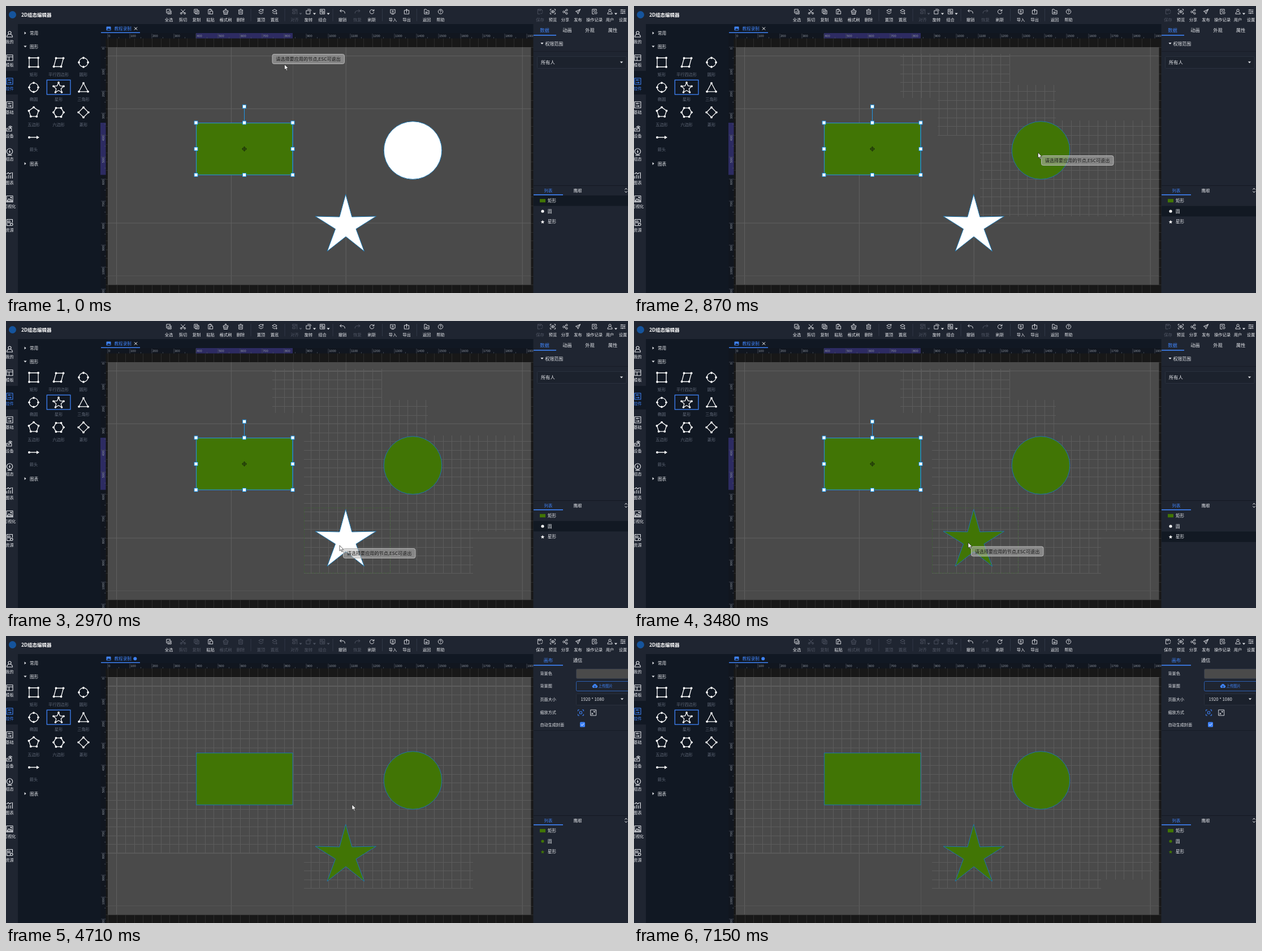
Recreate the animation shown at these times as an HTML page. Size 1100 by 509 pixels, loop 7550 ms.

```html
<!DOCTYPE html>
<html lang="zh">
<head>
<meta charset="utf-8">
<title>编辑器</title>
<style>
html, body { margin: 0; width: 100%; height: 100%; overflow: hidden; background: #1a1a1a; }
svg { display: block; width: 100vw; height: 100vh; font-family: "Noto Sans CJK SC", "Noto Sans CJK", "Noto Sans", sans-serif; }
</style>
</head>
<body>
<svg id="stage" viewBox="0 0 1100 509" preserveAspectRatio="none"></svg>
<script>
const LOOP = 7550, DONE = 4710;
const BLUE = '#3f83f8', WHITE = '#e6e8ec', DIM = '#505664', GREEN = '#417505', BAR = '#1f2531', PANEL = '#111823';
const CELL = 15.6, UNIT = 39;

const rect = (x, y, w, h, fill, more = '') => `<rect x="${x}" y="${y}" width="${w}" height="${h}" fill="${fill}" ${more}/>`;
const line = (x1, y1, x2, y2, color, w = 1) => `<path d="M${x1} ${y1}L${x2} ${y2}" stroke="${color}" stroke-width="${w}"/>`;
const dot = (x, y, r, fill, more = '') => `<circle cx="${x}" cy="${y}" r="${r}" fill="${fill}" ${more}/>`;
const text = (s, x, y, size = 7.5, fill = WHITE, anchor = 'middle', more = '') =>
  `<text x="${x}" y="${(y + size * .37).toFixed(2)}" font-size="${size}" fill="${fill}" text-anchor="${anchor}" ${more}>${s}</text>`;
const icon = (d, x, y, color = WHITE, scale = 1, w = 1) =>
  `<path d="${d}" transform="translate(${x} ${y}) scale(${scale})" fill="none" stroke="${color}" stroke-width="${w}" stroke-linejoin="round"/>`;
const caret = (x, y, color = WHITE, turn = 0) =>
  `<path d="M-2.6 -1.4H2.6L0 1.6Z" transform="translate(${x} ${y}) rotate(${turn})" fill="${color}"/>`;
const group = (id, body) => `<g id="${id}">${body}</g>`;
const range = (n, f) => Array.from({ length: n }, (_, i) => f(i)).join('');
const ring = (n, r, turn = -90) => Array.from({ length: n }, (_, i) => {
  const a = (turn + i * 360 / n) * Math.PI / 180;
  return [r * Math.cos(a), r * Math.sin(a)];
});
const starPts = (r, inner) => {
  const out = ring(5, r), mid = ring(5, inner, -54);
  return out.flatMap((p, i) => [p, mid[i]]);
};
const poly = pts => 'M' + pts.map(p => p.map(v => v.toFixed(2)).join(' ')).join('L') + 'Z';

const ICONS = {
  all: 'M-4.5 -4.5H2.5V2.5H-4.5ZM4.5 -2V4.5H-2.5M-3 -1L-1.3 .8L1.5 -2.5',
  cut: 'M-4 -4.5L2.5 3M4 -4.5L-2.5 3M-5 3.2a1.6 1.6 0 1 0 3.2 0a1.6 1.6 0 1 0 -3.2 0M1.8 3.2a1.6 1.6 0 1 0 3.2 0a1.6 1.6 0 1 0 -3.2 0',
  copy: 'M-4.5 -4.5H2V2.5H-4.5ZM-2 2.5V4.5H4.5V-2H2M-1.2 -3V1M-3.2 -1H.8',
  paste: 'M-4 -4H2.5V-1M-4 -4V4.5H-1M-1 -1H4.5V4.5H-1ZM-2 -4.8H1',
  brush: 'M-1 -5H1V-2H4.5V1H-4.5V-2H-1ZM-3.5 1V5H3.5V1M-1 5V3M1.3 5V3',
  bin: 'M-4.5 -3H4.5M-1.5 -4.7H1.5M-3.5 -3V4.7H3.5V-3M-1.2 -1V2.7M1.2 -1V2.7',
  up: 'M-4.5 -2L0 -4.5L2 -3.3M-4.5 -2L0 .5L2 -.6M-4.5 1.5L0 4.2L4.5 1.5M3.5 0V-4.5M2 -3L3.5 -4.7L5 -3',
  down: 'M-4.5 -2L0 -4.5L4.5 -2L0 .5ZM-4.5 1.5L0 4.2L1.5 3.3M3.5 0V4.5M2 3L3.5 4.7L5 3',
  align: 'M-4 -4.5H2.5V-1.5H-4ZM-4 1H1V4H-4ZM4.5 -5V5',
  turn: 'M-4.5 -2H3V4.5H-4.5ZM-2 -4.5H2.5Q4.8 -4.5 4.8 -1.5',
  join: 'M-4.5 -4.5H4.5V4.5H-4.5ZM-2.5 -2.5H.8V.8H-2.5ZM-.8 2.5H2.5V-.8',
  undo: 'M-4.8 -1.5H1.5Q4.8 -1 4.8 3.5M-2 -4.3L-4.8 -1.5L-2 1.3',
  redo: 'M4.8 -1.5H-1.5Q-4.8 -1 -4.8 3.5M2 -4.3L4.8 -1.5L2 1.3',
  fresh: 'M3.7 -1.5A4 4 0 1 0 4 1M4.2 -4.5V-1.3H1',
  input: 'M-1.5 -4H-4.5V3H4.5V-4H1.5M0 -4.8V.5M-2 -1.3L0 .7L2 -1.3M-2.5 5H2.5',
  output: 'M-1 -2.5H-4.5V4.5H4.5V-2.5H1M0 2V-4.8M-2 -2.8L0 -4.8L2 -2.8',
  back: 'M-1 -4.5H-4.5V4.5H4.5V-2H1L-1 -4.5M3 1.5H-2M0 -.5L-2 1.5L0 3.5',
  help: 'M-4.5 0a4.5 4.5 0 1 0 9 0a4.5 4.5 0 1 0 -9 0M-1.5 -1.2Q-1.3 -2.7 0 -2.7T1.5 -1.2Q1.4 -.2 0 .3V1.3M0 2.2V3',
  save: 'M0 4.5H-4.5V-4.5H2.5L4.5 -2.5V0M-2.5 -4.5V-2H1.5V-4.5M1 2.8L2.5 4.3L5 1.3',
  view: 'M-5 -2V-4.5H-2.5M5 -2V-4.5H2.5M-5 2V4.5H-2.5M5 2V4.5H2.5M-4 0Q0 -4.5 4 0Q0 4.5 -4 0M-1 0a1 1 0 1 0 2 0a1 1 0 1 0 -2 0',
  share: 'M-4.5 .5a1.7 1.7 0 1 0 3.4 0a1.7 1.7 0 1 0 -3.4 0M1 -3a1.7 1.7 0 1 0 3.4 0a1.7 1.7 0 1 0 -3.4 0M1 3.4a1.7 1.7 0 1 0 3.4 0a1.7 1.7 0 1 0 -3.4 0M-1.3 -.2L1.3 -2.2M-1.3 1.3L1.3 2.7',
  send: 'M4.5 -4.5L-4.5 -.5L-1.2 1L0 4.5ZM4.5 -4.5L-1.2 1',
  log: 'M0 4.5H-4V-4.5H4V-1M-2 -2H2M-2 .3H0M1 2.3a2 2 0 1 0 4 0a2 2 0 1 0 -4 0',
  user: 'M-2.3 -2.3a2.3 2.3 0 1 0 4.6 0a2.3 2.3 0 1 0 -4.6 0M-1.5 .3Q-4.5 1 -4.5 4.5H4.5Q4.5 1 1.5 .3',
  tune: 'M-5 -3.2H5M-5 0H5M-5 3.2H5M-2 -4.5V-2M2.5 -1.3V1.3M-1 2V4.5',
  page: 'M-5 -4.5H5V4.5H-5ZM-5 -1.3H5M-1 -1.3V4.5',
  box: 'M-5 -5H5V5H-5ZM-3 -2H3M-3 2H3M-1 -3.3V-.7M1.2 .7V3.3',
  device: 'M-5 0H3V4.5H-5ZM-3 2.2H0M1 0V-2M-2 -2Q1 -5 4 -2M-.5 -1Q1 -2.5 2.5 -1',
  cog: 'M-4.7 -.7a4.7 4.7 0 1 0 9.4 0a4.7 4.7 0 1 0 -9.4 0M0 -3V1.5M-1.5 0H1.5M-3.5 5.3H3.5',
  chart: 'M-4.5 5V1M-1.5 5V-1M1.5 5V0M4.5 5V-5M-5 -2.5L-2 -4.5L0 -2.5L3 -4.5',
  image: 'M-5 -5H5V5H-5ZM-4 3.5L-1.3 -.5L.8 2L2.3 .5L4 3.5ZM1.5 -2.3a.8 .8 0 1 0 1.6 0a.8 .8 0 1 0 -1.6 0',
  stock: 'M1 5H-4.5V-5H4.5V0M-2.5 -2.5H.5V.5H-2.5ZM1 3a2 2 0 1 0 4 0a2 2 0 1 0 -4 0'
};

// label, icon, x, mode: 1 always off, 2 off once editing ends, 3 on once editing ends
const TOOLS = [
  ['全选', 'all', 288], ['剪切', 'cut', 313, 2], ['复制', 'copy', 337, 2], ['粘贴', 'paste', 361.5],
  ['格式刷', 'brush', 388.5, 2], ['删除', 'bin', 415, 2], ['置顶', 'up', 451, 2], ['置底', 'down', 475, 2],
  ['对齐', 'align', 510.5, 1, 1], ['旋转', 'turn', 535, 2, 1], ['组合', 'join', 559.5, 2, 1],
  ['撤销', 'undo', 595], ['恢复', 'redo', 621.5, 1], ['刷新', 'fresh', 647],
  ['导入', 'input', 684], ['导出', 'output', 708.5], ['返回', 'back', 744], ['帮助', 'help', 768.5],
  ['保存', 'save', 944.5, 3], ['预览', 'view', 967], ['分享', 'share', 989], ['发布', 'send', 1011.5],
  ['操作记录', 'log', 1040.5], ['用户', 'user', 1068, 0, 1], ['设置', 'tune', 1091]
];
const tools = done => TOOLS.map(([label, name, x, mode = 0, menu]) => {
  const off = mode === 1 || mode === 2 && done || mode === 3 && !done;
  const color = off ? DIM : WHITE;
  return icon(ICONS[name], x, 10, color, .92) + text(label, x, 24, 7.3, color) + (menu ? caret(x + 10.5, 14, color) : '');
}).join('');

function topBar() {
  return rect(0, 0, 1100, 32, BAR) + dot(11.5, 15.5, 6.5, '#15549c') +
    text('2D组态编辑器', 27, 15.5, 8.5, '#fff', 'start', 'font-weight="700"') +
    [433, 493, 578, 665.5, 726.5].map(x => line(x, 5, x, 27, '#303746')).join('');
}

function rail() {
  const items = [['我的', 'user'], ['模板', 'page'], ['控件', 'box'], ['基础', 'box'], ['设备', 'device'],
    ['组态', 'cog'], ['图表', 'chart'], ['可视化', 'image'], ['资源', 'stock']];
  return rect(0, 32, 21, 477, BAR) + rect(0, 115, 21, 42, PANEL) + items.map(([label, name], i) => {
    const color = i === 2 ? BLUE : WHITE, y = 50 + i * 41.75;
    return icon(ICONS[name], 6.5, y, color, 1.1) + text(label, 6.5, y + 13, 7.2, color);
  }).join('');
}

const nodes = (pts, closed = true) => icon(poly(pts).slice(0, closed ? undefined : -1), 0, 0, '#fff', 1, 1.3) +
  pts.map(p => dot(p[0].toFixed(2), p[1].toFixed(2), 1.9, '#fff')).join('');

function palette() {
  const round = dot(0, 0, 8, 'none', 'stroke="#fff" stroke-width="1.3"') + ring(4, 8).map(p => dot(...p, 1.9, '#fff')).join('');
  const star = icon(poly(starPts(9.5, 4.5)), 0, 1, '#fff', 1, 1.3) + ring(5, 9.5).map(p => dot(p[0], p[1] + 1, 1.8, '#fff')).join('');
  const shapes = [
    ['矩形', nodes([[-8, -8], [8, -8], [8, 8], [-8, 8]])],
    ['平行四边形', nodes([[-4.5, -7.5], [8.5, -7.5], [4.5, 7.5], [-8.5, 7.5]])],
    ['圆形', round], ['椭圆', round], ['星形', star],
    ['三角形', nodes([[0, -7.5], [8, 7.5], [-8, 7.5]])],
    ['五边形', nodes(ring(5, 9))], ['六边形', nodes(ring(6, 9, 0))], ['菱形', nodes(ring(4, 8.8))],
    ['箭头', dot(-8, 0, 2, '#fff') + line(-8, 0, 7, 0, '#fff', 1.4) + '<path d="M5 -3L10 0L5 3Z" fill="#fff"/>']
  ];
  return rect(21, 32, 146, 477, PANEL) +
    [['常用', 48.5, -90], ['图形', 72.5, 0], ['图表', 280, -90]].map(([s, y, a]) => caret(34, y - .5, WHITE, a) + text(s, 42, y, 7.6, WHITE, 'start')).join('') +
    rect(72.3, 131.3, 41.6, 25.6, 'none', `stroke="${BLUE}" stroke-width="1.3"`) +
    shapes.map(([label, art], i) => {
      const x = 49 + i % 3 * 44, y = 100 + Math.floor(i / 3) * 44.3;
      return `<g transform="translate(${x} ${y})">${art}</g>` + text(label, x, y + 21.3, 7.2, '#636b7a');
    }).join('');
}

const vLines = (y1, y2, color) => range(49, i => line(Math.round(164.4 + i * CELL) + .5, y1, Math.round(164.4 + i * CELL) + .5, y2, color));
const hLines = (x1, x2, color) => range(29, i => line(x1, Math.round(73 + i * CELL) + .5, x2, Math.round(73 + i * CELL) + .5, color));

function board() {
  const major = [1, 14, 27, 47].map(i => line(180 + i * CELL, 73, 180 + i * CELL, 494, '#606060')).join('') +
    line(507.5, 73, 507.5, 494, '#555') +
    [1, 7, 20].map(i => line(180, 73 + i * CELL, 928, 73 + i * CELL, '#606060')).join('') + line(180, 478.5, 928, 478.5, '#555');
  return rect(167, 32, 766, 477, '#181818') + vLines(57, 509, '#2b2b2b') + hLines(176, 933, '#2b2b2b') +
    rect(180, 73, 748.5, 421.5, '#4a4a4a') + major +
    `<clipPath id="clip"><path id="shown"/></clipPath><g clip-path="url(#clip)">${vLines(73, 494, '#5c5c5c')}${hLines(180, 928.5, '#5c5c5c')}</g>`;
}

function rulers() {
  const ink = '#9299a3', tick = '#4a505b', font = 'font-family="Liberation Sans, Arial, sans-serif"';
  return rect(167, 32, 766, 16, PANEL) + rect(167, 48, 766, 9.5, '#11161f') + rect(167, 48, 9.5, 461, '#11161f') +
    group('span', rect(336, 48, 171, 9.5, '#2d2b62') + rect(167, 207, 9.5, 92.5, '#2d2b62')) +
    range(39, i => line(180 + i * UNIT / 2, i % 2 ? 55 : 49, 180 + i * UNIT / 2, 57.5, tick, .8)) +
    range(23, i => line(i % 2 ? 174 : 168, 73 + i * UNIT / 2, 176.5, 73 + i * UNIT / 2, tick, .8)) +
    range(20, i => text(i * 100, 181.2 + i * UNIT, 52.5, 5.6, ink, 'start', font)) +
    range(11, i => `<g transform="translate(171.5 ${74 + i * UNIT}) rotate(-90)">${text(i * 100, 0, 0, 5.6, ink, 'end', font)}</g>`) +
    text('1100', 0, 0, 5.6, ink, 'end', `${font} transform="translate(171.5 503) rotate(-90)"`) +
    rect(177.5, 36.5, 8, 7, BLUE, 'rx="1"') + '<path d="M178.5 42.5L181 39.5L182.5 41L183.5 40L185 42.5Z" fill="#111823"/>' +
    text('教程录制', 191.5, 40.3, 7.6, BLUE, 'start') + rect(168, 46.5, 69, 1.5, BLUE) +
    group('close', icon('M-2.5 -2.5L2.5 2.5M2.5 -2.5L-2.5 2.5', 229.5, 40, '#fff')) + group('dirty', dot(228.3, 40.3, 3, BLUE));
}

const STAR = 'M600.7 334L611.8 374L654.5 373L619 395.5L633.5 435L601 409L568 435L582.5 395.5L547 373L589.8 374Z';

function shapes() {
  const edge = 'stroke="#1b76b0" stroke-width="1"';
  const handles = [[336, 207], [421.5, 207], [507, 207], [336, 253.5], [507, 253.5], [336, 299.5], [421.5, 299.5], [507, 299.5], [421.5, 178.3]]
    .map(([x, y]) => rect(x - 3, y - 3, 6, 6, '#fff', 'stroke="#1f95e8"')).join('');
  return rect(336.5, 207.5, 170.5, 92, GREEN, edge) +
    `<circle id="disc" cx="719.5" cy="256" r="51.3" ${edge}/>` +
    group('hover', rect(527.5, 331.5, 152, 115.5, 'none', 'stroke="#3c6a30" stroke-dasharray="4 2" opacity=".6"')) +
    `<path id="star" d="${STAR}" ${edge}/>` +
    group('picked', rect(336.5, 207.5, 170.5, 92, 'none', 'stroke="#1f95e8"') + line(421.5, 178, 421.5, 207, '#1f95e8') + handles +
      icon('M-3 0a3 3 0 1 0 6 0a3 3 0 1 0 -6 0M-4.5 0H4.5M0 -4.5V4.5', 421.5, 253.5, '#17260c', 1, .9));
}

const tabs = (names, y, size, mark) => names.map(([s, x], i) => text(s, x, y, size, i ? WHITE : BLUE)).join('') + rect(933, mark[0], mark[1], 1.6, BLUE);

function nodePanel() {
  return tabs([['数据', 952.5], ['动画', 992.5], ['外观', 1032.5], ['属性', 1073]], 42.5, 8.3, [51, 40]) +
    caret(948, 66.5) + text('权限范围', 953.5, 67, 7.9, WHITE, 'start') + line(933, 80.5, 1100, 80.5, '#171c26') +
    rect(939.5, 89.5, 157.5, 21, '#1c222d', 'stroke="#2a313e" rx="1"') + text('所有人', 946, 100, 8.2, WHITE, 'start') + caret(1088.5, 100);
}

function pagePanel() {
  const labels = [['背景色', 66], ['背景图', 88], ['页面大小', 112], ['缩放方式', 135.5], ['自动生成封面', 157]];
  return tabs([['画布', 959], ['通信', 1011]], 42.5, 8.3, [51, 52]) + labels.map(([s, y]) => text(s, 944.5, y, 7.1, WHITE, 'start')).join('') +
    rect(1008.5, 58.5, 95, 17, '#4a4a4a', 'stroke="#343b49" rx="2"') +
    rect(1008.5, 80.5, 95, 17, 'none', 'stroke="#2d5faf" rx="2"') +
    '<path d="M1038.5 92a2.5 2.5 0 0 1 0 -4.8a3.2 3.2 0 0 1 6 0a2.5 2.5 0 0 1 0 4.8Z" fill="#3f83f8"/>' +
    icon('M0 2.5V-1M-1.4 .3L0 -1.1L1.4 .3', 1041.5, 89.5, BAR, 1, .8) + text('上传图片', 1047.5, 89, 6.3, BLUE, 'start') +
    rect(1008.5, 102.5, 91, 20, '#1b212c', 'stroke="#2a313e" rx="1"') + text('1920 * 1080', 1016.5, 112.5, 7.7, WHITE, 'start') + caret(1089.5, 112) +
    icon('M-5 -2.5V-5H-2.5M5 -2.5V-5H2.5M-5 2.5V5H-2.5M5 2.5V5H2.5M-2 -2H2V2H-2Z', 1016.5, 136, BLUE) +
    icon('M-5 -5H5V5H-5ZM3.5 -3.5L1 -1M1 -3.3V-1H3.3M-3.5 3.5L-1 1M-1 3.3V1H-3.3', 1038.7, 136, WHITE, 1, .9) +
    rect(1015, 152.5, 9, 9, BLUE, 'rx="1.5"') + icon('M-2.5 0L-.7 1.8L2.5 -1.7', 1019.5, 157, '#fff') +
    line(933, 167.5, 1100, 167.5, '#171c26');
}

function listPanel() {
  return line(933, 318.5, 1100, 318.5, '#141922') + tabs([['列表', 959], ['鹰眼', 1011]], 327, 7.4, [334, 52]) +
    icon('M-2 -1.5L0 -3.8L2 -1.5M-2 1.5L0 3.8L2 1.5', 1096.5, 327, '#fff') +
    `<rect id="row" x="933" width="167" height="18.5" fill="#121923"/>` +
    rect(944, 342.3, 10, 6, GREEN) + dot(949, 364, 2.6, '#fff', 'class="mini"') +
    `<path class="mini" d="${poly(starPts(3.6, 1.5))}" transform="translate(949 383)"/>` +
    ['矩形', '圆', '星形'].map((s, i) => text(s, 958, 345.3 + i * 18.7, 7.5, WHITE, 'start')).join('');
}

const stage = document.getElementById('stage');
stage.innerHTML = board() + shapes() + rulers() + topBar() + group('toolsA', tools(false)) + group('toolsB', tools(true)) +
  rail() + palette() + rect(932.5, 32, 168, 477, BAR) + group('panelA', nodePanel()) + group('panelB', pagePanel()) + listPanel() +
  group('tip', rect(.5, .5, 127.5, 17, 'rgba(185,185,185,.55)', 'stroke="#b9b9b9" rx="3"') + text('请选择要应用的节点,ESC可退出', 64, 9, 8.15, '#161616')) +
  group('mouse', '<path d="M0 0V9.6L2.2 7.6L3.8 11.3L5.3 10.6L3.8 7.1H6.8Z" fill="#fff" stroke="#222" stroke-width=".7"/>');

// time, pointer x, y, hint x, y
const MOVES = [
  [0, 492.5, 103.5, 470.5, 85], [120, 556, 152, 537, 140], [240, 612, 203, 618, 208], [380, 678, 236, 684, 241],
  [500, 706, 254, 712, 259], [620, 714.5, 260, 720, 265], [1460, 692, 320, 698, 325], [1580, 614, 376, 620, 375],
  [1730, 590, 398, 596, 403], [3480, 591, 393, 596, 399.5], [3620, 591, 390, 598, 396], [3740, 592, 387, 599, 393],
  [4140, 594, 385, 600, 391], [4280, 595.5, 384.5, 601.5, 390], [4560, 612, 299, 618, 305],
  [4980, 700, 290], [5100, 830, 370], [5220, 909, 419], [5370, -50, -50]
];
// time at which part of the fine grid appears, then its box
const REVEALS = [
  [120, 471, 85, 665, 163], [240, 537, 140, 746, 230], [380, 612, 203, 848, 309], [870, 612, 203, 929, 373],
  [1460, 527, 203, 826, 448], [DONE, 180, 73, 929, 386], [4980, 612, 203, 917, 432]
];

const el = id => document.getElementById(id);
const show = (id, on) => el(id).setAttribute('display', on ? 'inline' : 'none');
const place = (id, x, y) => el(id).setAttribute('transform', `translate(${x} ${y})`);

function draw(t) {
  const done = t >= DONE;
  const [, mx, my, hx = 0, hy = 0] = MOVES.filter(m => m[0] <= t).pop();
  place('mouse', mx, my);
  place('tip', hx, hy);
  ['toolsA', 'panelA', 'close', 'span', 'picked', 'row', 'tip'].forEach(id => show(id, !done));
  ['toolsB', 'panelB', 'dirty'].forEach(id => show(id, done));
  show('hover', t >= 1580 && t < 4560);
  el('disc').setAttribute('fill', t < 870 ? '#fff' : GREEN);
  el('star').setAttribute('fill', t < 3480 ? '#fff' : GREEN);
  el('row').setAttribute('y', 336 + 18.7 * (t < 870 ? 0 : t < 3480 ? 1 : 2));
  document.querySelectorAll('.mini').forEach(n => n.setAttribute('fill', done ? GREEN : '#fff'));
  el('shown').setAttribute('d', REVEALS.filter(r => r[0] <= t).map(([, a, b, c, d]) => `M${a} ${b}H${c}V${d}H${a}Z`).join('') || 'M0 0');
}

const start = performance.now();
function tick() {
  draw((performance.now() - start) % LOOP);
  requestAnimationFrame(tick);
}
tick();
</script>
</body>
</html>
```
